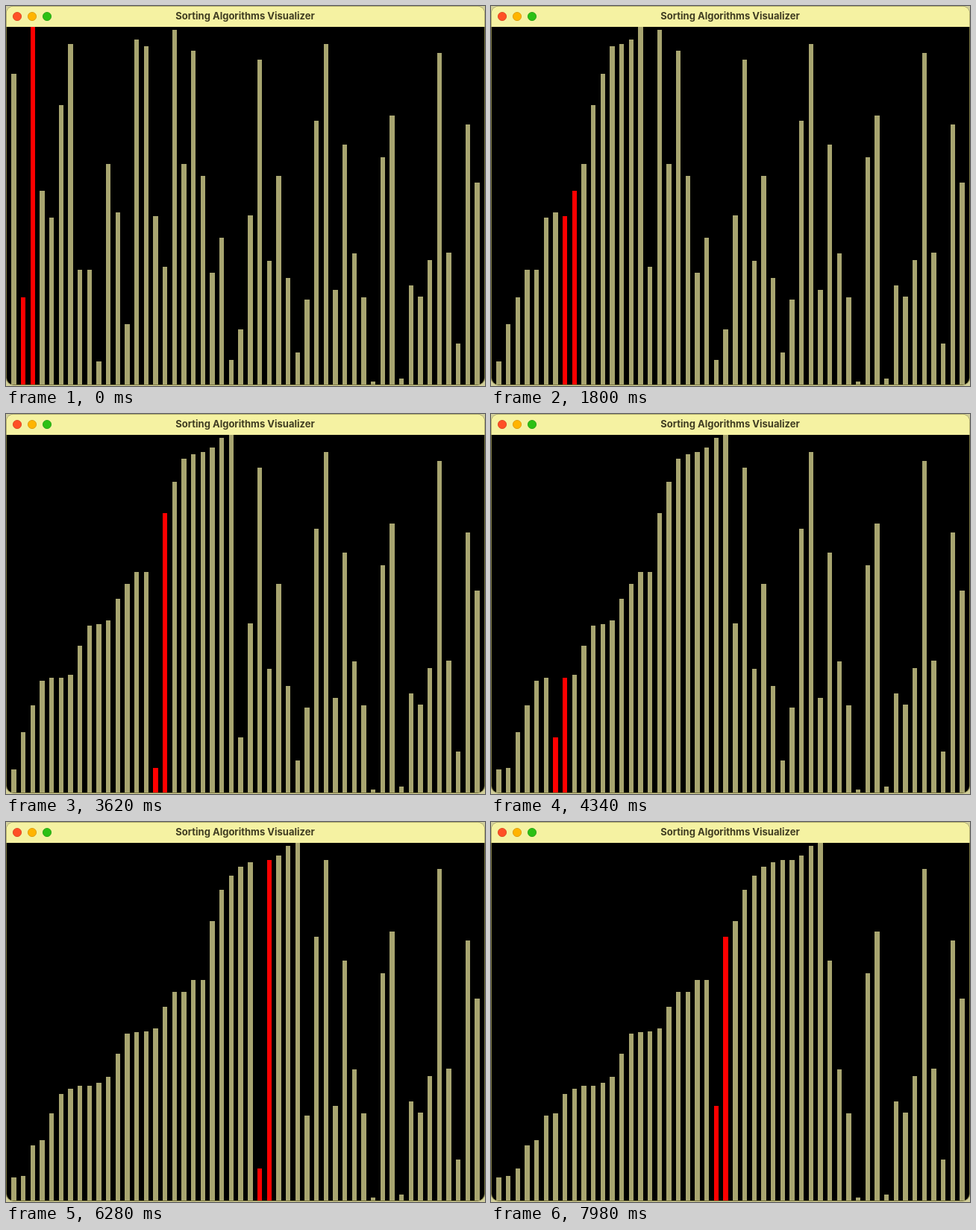
An HTML page with a canvas for the animation above (8 s loop, 642 by 510 pixels).

```html
<!DOCTYPE html>
<html lang="en">
<head>
<meta charset="utf-8">
<title>Sorting</title>
<style>
  html, body { margin: 0; width: 100%; height: 100%; overflow: hidden; background: #d2cf9c; }
  canvas { display: block; width: 642px; height: 510px; }
</style>
</head>
<body>
<canvas id="stage" width="642" height="510"></canvas>
<script>
const ctx = document.getElementById('stage').getContext('2d');
const LOOP = 8000, FLOOR = 508, BAR = 640 / 101;

// Top edge of each bar; a larger value is a shorter bar.
const tops = [
  91, 28, 391, 248, 284, 133, 51, 354, 354, 477,
  212, 277, 427, 45, 54, 282, 350, 32, 212, 60,
  228, 358, 311, 475, 434, 281, 72, 342, 228, 365,
  465, 394, 154, 51, 381, 186, 332, 391, 504, 203,
  147, 500, 375, 390, 341, 63, 331, 453, 159, 237
];

// Insertion sort by adjacent swaps, with one idle step after each key.
function sortSteps(source) {
  const a = source.slice(), steps = [];
  for (let i = 2; i < a.length; i++) {
    for (let j = i; j > 0 && a[j - 1] < a[j]; j--) {
      [a[j - 1], a[j]] = [a[j], a[j - 1]];
      steps.push({ bars: a.slice(), at: j - 1 });
    }
    steps.push(steps[steps.length - 1]);
  }
  return steps;
}
const steps = sortSteps(tops);

// Pace of the sort: [screen refresh, sort step]
const pace = [[0, 0], [38, 76], [55, 111], [77, 160], [78, 160], [107, 224], [134, 279], [171, 356]];

// Refreshes come in threes, held for 20, 100 and 20 ms.
function refreshAt(t) {
  const r = t % 140;
  return 3 * Math.floor(t / 140) + (r >= 120 ? 2 : r >= 20 ? 1 : 0);
}

function stepAt(t) {
  const n = refreshAt(t);
  let k = 1;
  while (k < pace.length - 1 && n > pace[k][0]) k++;
  const [n0, s0] = pace[k - 1], [n1, s1] = pace[k];
  return steps[Math.floor(s0 + (s1 - s0) * (n - n0) / (n1 - n0) + 1e-6)];
}

function panel(x, y, w, h, radius, color) {
  ctx.fillStyle = color;
  ctx.beginPath();
  ctx.roundRect(x, y, w, h, radius);
  ctx.fill();
}

function light(x, fill, edge) {
  ctx.beginPath();
  ctx.arc(x, 14, 5.6, 0, Math.PI * 2);
  ctx.fillStyle = fill;
  ctx.fill();
  ctx.strokeStyle = edge;
  ctx.lineWidth = 0.8;
  ctx.stroke();
}

function drawWindow() {
  ctx.fillStyle = '#d2cf9c';
  ctx.fillRect(0, 0, 642, 510);
  panel(0, 0, 642, 509, 10, '#77733f');
  panel(1, 28, 640, 480, [0, 0, 9, 9], '#000');
  panel(0.5, 0.5, 641, 27.5, [9, 9, 0, 0], '#f5f2a2');
  light(15, '#ff5026', '#d83c18');
  light(35, '#ffb400', '#d99400');
  light(55, '#2cc014', '#1c9c0c');
  ctx.fillStyle = '#403d22';
  ctx.font = '700 13px Inter, sans-serif';
  ctx.textAlign = 'center';
  ctx.fillText('Sorting Algorithms Visualizer', 320.5, 18);
}

function drawBars({ bars, at }) {
  bars.forEach((top, i) => {
    const left = Math.round(1 + BAR * (2 * i + 1));
    const right = Math.round(1 + BAR * (2 * i + 2));
    ctx.fillStyle = i === at || i === at + 1 ? '#ff0000' : '#a8a570';
    ctx.fillRect(left, top, right - left, FLOOR - top);
  });
}

const start = performance.now();
function render() {
  drawWindow();
  drawBars(stepAt((performance.now() - start) % LOOP));
  requestAnimationFrame(render);
}
render();
</script>
</body>
</html>
```
